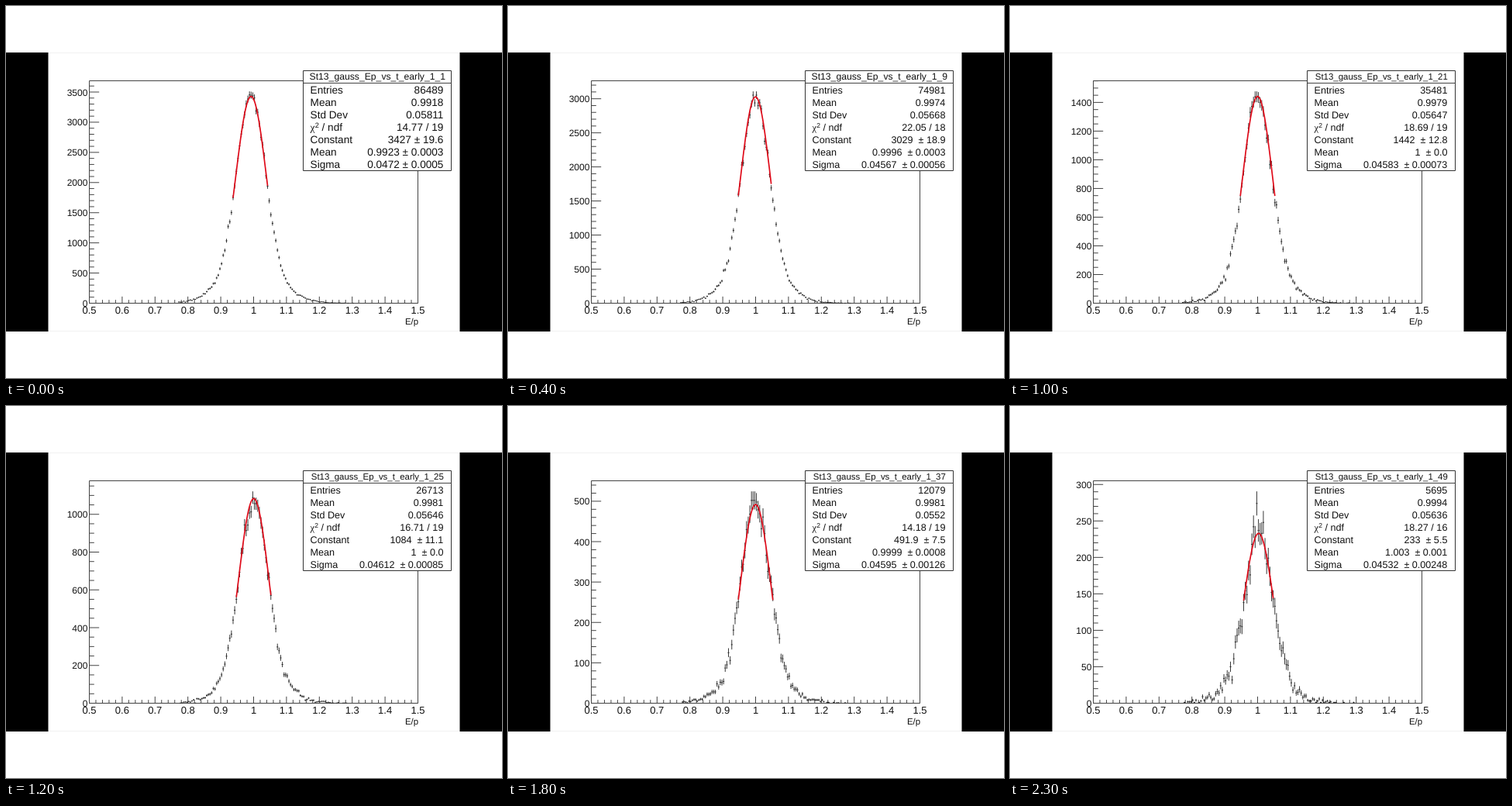
Write an HTML page that moves like this. It is 640 px wide and 480 px high and loops after 2400 ms.

```html
<!DOCTYPE html>
<html lang="en">
<head>
<meta charset="utf-8">
<title>E/p fit by run</title>
<style>
html, body { margin: 0; width: 100%; height: 100%; overflow: hidden; background: #fff; }
svg { display: block; width: 640px; height: 480px; }
text {
  font-family: "Liberation Sans", Arial, sans-serif;
  fill: #111; white-space: pre; text-rendering: geometricPrecision;
}
.line { fill: none; stroke: #444; stroke-width: 1; }
.data { fill: none; stroke: #222; stroke-width: 0.9; }
.fit { fill: none; stroke: #e00b1a; stroke-width: 1.7; }
.edge { fill: none; stroke: #f2f2f2; }
.end { text-anchor: end; }
.mid { text-anchor: middle; }
.chi { font-family: "Liberation Serif", Times, serif; }
</style>
</head>
<body>
<svg viewBox="0 0 640 480">
  <path class="edge" d="M54 60.5H586M54 419.5H586"/>
  <path d="M0 60H54.5V420H0ZM585.5 60H640V420H585.5Z"/>
  <g id="plot"></g>
</svg>
<script>
const LEFT = 107.5, RIGHT = 531.5, TOP = 96.5, BASE = 383.5;
const STEP_MS = 100, STEPS = 24, BIN = 0.005;
const FIRST_BIN = 54, LAST_BIN = 160;

// Key runs; everything between them is interpolated
const fields = ['run', 'entries', 'mean', 'dev', 'chi2', 'ndf', 'height', 'mu', 'sigma', 'top'];
const keys = [
  [1, 86489, 0.9918, 0.05811, 14.77, 19, 3427, 0.9923, 0.0472, 3452],
  [5, 95847, 0.9974, 0.05675, 24.7, 18, 3860, 0.9996, 0.0458, 3898],
  [13, 58657, 0.9975, 0.05662, 19.69, 19, 2377, 0.9997, 0.04555, 2391],
  [21, 35481, 0.9979, 0.05647, 18.69, 19, 1442, 1, 0.04583, 1439],
  [31, 17450, 0.9983, 0.05644, 14.13, 18, 705.8, 1.001, 0.04657, 716],
  [37, 12079, 0.9981, 0.0552, 14.18, 19, 491.9, 0.9999, 0.04595, 502],
  [49, 5695, 0.9994, 0.05636, 18.27, 16, 233, 1.003, 0.04532, 274]
];

const px = x => LEFT + (x - 0.5) * (RIGHT - LEFT);
const center = bin => 0.5 + BIN * (bin + 0.5);
const bell = (d, s) => Math.exp(-0.5 * (d / s) ** 2);
const f2 = v => v.toFixed(2);
const text = (x, y, size, s, cls = '') =>
  `<text x="${f2(x)}" y="${f2(y)}" font-size="${size}" class="${cls}">${s}</text>`;
const path = (d, cls) => `<path class="${cls}" d="${d}"/>`;

function random(seed) {
  return () => {
    seed = seed + 0x6D2B79F5 | 0;
    let t = Math.imul(seed ^ seed >>> 15, 1 | seed);
    t = t + Math.imul(t ^ t >>> 7, 61 | t) ^ t;
    return ((t ^ t >>> 14) >>> 0) / 4294967296;
  };
}

function fitAt(run) {
  const k = Math.max(1, keys.findIndex(key => run <= key[0]));
  const a = keys[k - 1], b = keys[k], p = (run - a[0]) / (b[0] - a[0]);
  const fit = {};
  fields.forEach((name, i) => fit[name] = a[i] * Math.pow(b[i] / a[i], p));
  fit.run = run;
  fit.ndf = Math.round(fit.ndf);
  // Errors shrink with statistics and grow as the fit range narrows
  const root = Math.sqrt(fit.entries), lost = 19 - fit.ndf;
  fit.heightErr = fit.height / root * (1.678 + 0.03 * lost);
  fit.muErr = fit.sigma / root * 2;
  fit.sigmaErr = fit.sigma / root * (3.003 + 0.375 * lost);
  return fit;
}

// A narrow core on a wide foot, with counting noise; the peak bin holds the top
function makeCounts({ run, height, mu, sigma, top }) {
  const rnd = random(run * 977);
  const peak = Math.floor((mu - 0.5) / BIN) - 1;
  const counts = [];
  for (let bin = FIRST_BIN; bin <= LAST_BIN; bin++) {
    const d = center(bin) - mu;
    const want = height * (0.8 * bell(d, 0.9 * sigma) + 0.2 * bell(d, 1.7 * sigma));
    const noise = Math.sqrt(-2 * Math.log(1 - rnd())) * Math.cos(2 * Math.PI * rnd());
    const n = Math.round(want + noise * Math.sqrt(want));
    counts[bin] = bin === peak ? top : Math.min(top, Math.max(0, n));
  }
  return counts;
}

function tickStep(max) {
  for (let pow = 1; ; pow *= 10)
    for (const m of [1, 2, 5])
      if (max / (m * pow) <= 10) return { major: m * pow, parts: m === 2 ? 4 : 5 };
}

function axes(max, py) {
  let d = `M${LEFT} ${TOP}H${RIGHT}V${BASE}H${LEFT}Z`, labels = '';
  for (let i = 0; i <= 50; i++) {
    const v = 0.5 + i / 50, x = px(v), big = i % 5 === 0;
    d += `M${f2(x)} ${BASE}v${big ? -8.6 : -4.3}`;
    if (big) labels += text(x, 396.6, 13, +f2(v), 'mid');
  }
  const { major, parts } = tickStep(max);
  for (let i = 0; i * major / parts <= max; i++) {
    const v = i * major / parts, y = py(v), big = i % parts === 0;
    d += `M${LEFT} ${f2(y)}h${big ? 12.7 : 6.3}`;
    if (big) labels += text(105.4, y + 4.5, 12, v, 'end');
  }
  return path(d, 'line') + labels + text(532, 411, 11.4, 'E/p', 'end');
}

function points(counts, py) {
  let d = '';
  counts.forEach((n, bin) => {
    if (!n) return;
    const x = px(center(bin)), e = Math.sqrt(n);
    d += `M${f2(x - 1.06)} ${f2(py(n))}h2.12M${f2(x)} ${f2(py(n + e))}V${f2(py(n - e))}`;
  });
  return path(d, 'data');
}

function fitCurve({ height, mu, sigma, ndf }, py) {
  const width = (ndf + 2) * BIN;
  const from = center(Math.floor((mu - width / 2 - center(0)) / BIN + 0.1));
  const pts = [];
  for (let i = 0; i <= 40; i++) {
    const x = from + width * i / 40;
    pts.push(f2(px(x)) + ' ' + f2(py(height * bell(x - mu, sigma))));
  }
  return path('M' + pts.join('L'), 'fit');
}

// Four significant digits, and an error with as many decimals
function withError(value, error) {
  const s = String(+value.toPrecision(4));
  const decimals = (s.split('.')[1] || '').length;
  return `${s} ± ${error.toFixed(Math.max(1, decimals))}`;
}

function statsBox(fit) {
  const values = [
    Math.round(fit.entries),
    +fit.mean.toPrecision(4),
    +fit.dev.toPrecision(4),
    `${+fit.chi2.toPrecision(4)} / ${fit.ndf}`,
    withError(fit.height, fit.heightErr),
    withError(fit.mu, fit.muErr),
    withError(fit.sigma, fit.sigmaErr)
  ];
  // A long line shrinks the whole box of text
  const long = values[6].length > 15;
  const size = long ? 12.6 : 13.6;
  const pad = s => long ? String(s).replace(' ±', '\u00a0\u00a0±') : s;
  const chi = `<tspan class="chi">χ</tspan><tspan dy="-4" font-size="${size * 0.68}">2</tspan>` +
    '<tspan dy="4"> / ndf</tspan>';
  const names = ['Entries', 'Mean', 'Std Dev', chi, 'Constant', 'Mean', 'Sigma'];
  return '<path d="M383.5 83.5H574.5V212.5H383.5Z" fill="#fff" stroke="#333"/>' +
    path('M383.5 99.5H574.5', 'line') +
    text(479.3, 95, fit.run < 10 ? 12.2 : 11.45, 'St13_gauss_Ep_vs_t_early_1_' + fit.run, 'mid') +
    names.map((name, i) => {
      const y = 112.8 + 16.1 * i;
      return text(392.6, y, size, name) + text(564.4, y, size, pad(values[i]), 'end');
    }).join('');
}

function scene(step) {
  const fit = fitAt(step < STEPS - 1 ? 2 * step + 1 : 49);
  const max = 1.05 * (fit.top + Math.sqrt(fit.top));
  const py = n => BASE - n / max * (BASE - TOP);
  return axes(max, py) + points(makeCounts(fit), py) + fitCurve(fit, py) + statsBox(fit);
}

const scenes = Array.from({ length: STEPS }, (_, i) => scene(i));
const plot = document.getElementById('plot');
const start = performance.now();
let shown = -1;

function draw() {
  const step = Math.floor((performance.now() - start) / STEP_MS) % STEPS;
  if (step !== shown) plot.innerHTML = scenes[shown = step];
  requestAnimationFrame(draw);
}
draw();
</script>
</body>
</html>
```
